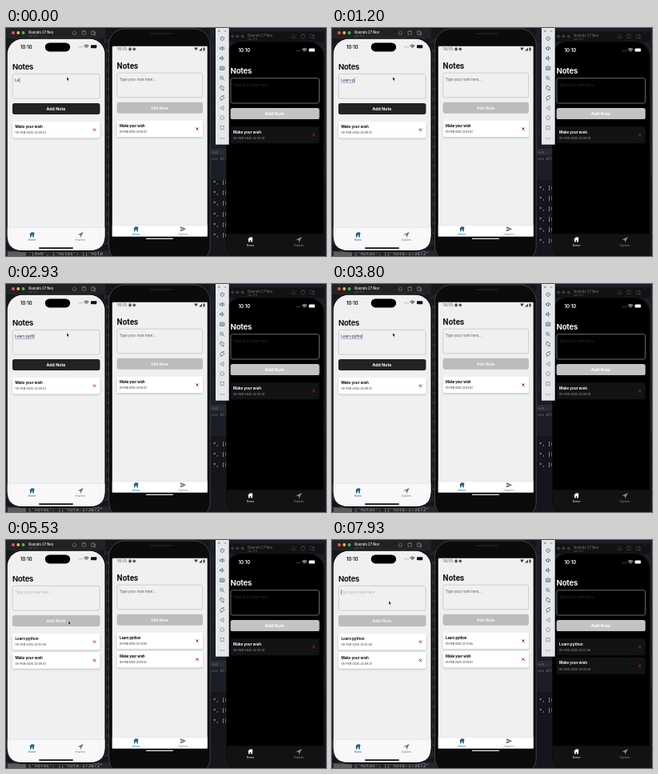
These frames come from a looping animation (400 px wide and 285 px high, 8 s). An HTML page:

```html
<!DOCTYPE html>
<html lang="en">
<head>
<meta charset="utf-8">
<title>Notes on three devices</title>
<style>
  html, body { margin: 0; width: 100%; height: 100%; overflow: hidden; background: #15161b; }
  svg { display: block; width: 100vw; height: 100vh; }
  text { font-family: Inter, Roboto, sans-serif; white-space: pre; }
  .android text { font-family: Roboto, Inter, sans-serif; }
  .mono text { font-family: "DejaVu Sans Mono", "Liberation Mono", monospace; }
  .bold { font-weight: 700; }
  .semi { font-weight: 600; }
  .mid { text-anchor: middle; }
</style>
</head>
<body>
<svg id="stage" viewBox="0 0 400 285" preserveAspectRatio="none">
  <defs>
    <filter id="soft" x="-10%" y="-20%" width="120%" height="160%"><feGaussianBlur stdDeviation="1"/></filter>
    <path id="house" d="M0-4.2 4.2-.4H3V3.8H.9V1H-.9V3.8H-3V-.4H-4.2ZM2-4H3.2V-1H2Z"/>
    <path id="plane" d="M-4.2.3 4.2-4 .3 4.3-.2.2Z"/>
    <path id="send" d="M-4-3.6 4.3 0-4 3.6V.9L1.2 0-4-.9Z"/>
    <g id="wifi" fill="none" stroke-width=".9">
      <path d="M-3-.8Q0-3.4 3-.8M-1.7.6Q0-.9 1.7.6M-.4 1.6H.4"/>
    </g>
    <g id="tools" fill="none" stroke-width=".7">
      <path d="M-2 2.4H2V-1L0-2.8-2-1Z"/>
      <path d="M10.5-2H15.5V2.4H10.5ZM12-2V-3H14V-2"/>
      <path d="M23.5-2.5H27.5V2.5H23.5ZM26-1H29V3H26"/>
    </g>
  </defs>
</svg>
<script>
const LOOP = 8000;
const NAME = 'Quendo 27 Neo';
const NS = 'http://www.w3.org/2000/svg';
const stage = document.getElementById('stage');

function el(parent, tag, attrs = {}, content) {
  const node = document.createElementNS(NS, tag);
  for (const key in attrs) node.setAttribute(key, attrs[key]);
  if (content !== undefined) node.textContent = content;
  parent.appendChild(node);
  return node;
}
const group = (parent, x, y, cls = '', scale = 1) =>
  el(parent, 'g', { transform: `translate(${x} ${y}) scale(${scale})`, class: cls });
const box = (parent, x, y, width, height, fill, rx = 0, more = {}) =>
  el(parent, 'rect', { x, y, width, height, fill, rx, ...more });
const label = (parent, x, y, size, fill, content, cls = '', more = {}) =>
  el(parent, 'text', { x, y, 'font-size': size, fill, class: cls, ...more }, content);
const icon = (parent, id, x, y, colour, scale = 1) =>
  el(parent, 'use', { href: '#' + id, transform: `translate(${x} ${y}) scale(${scale})`, fill: colour, stroke: id === 'wifi' || id === 'tools' ? colour : 'none' });
const path = (parent, d, stroke, width = .8, fill = 'none') =>
  el(parent, 'path', { d, stroke, 'stroke-width': width, fill });
const show = (node, on) => node.setAttribute('visibility', on ? 'visible' : 'hidden');

const LIGHT = { ink: '#111315', page: '#f0f0f0', line: '#c4c4c4', hint: '#b0b0b0', card: '#fff', sub: '#333', cross: '#d01824', off: '#bcbcbc', offInk: '#f3f3f3' };
const DROID = { ...LIGHT, hint: '#666' };
const DARK = { ink: '#f2f2f2', page: '#000', line: '#858585', hint: '#303030', card: '#111314', sub: '#a0a3a6', cross: '#8c1820', off: '#c3c3c3', offInk: '#fff' };

// --- terminal behind the devices
function terminal() {
  const g = el(stage, 'g', { class: 'mono' });
  box(g, 0, 0, 400, 285, '#15161b');
  box(g, 255, 0, 145, 190, '#1b1e27');
  for (let i = 0; i < 23; i++) {
    label(g, 122, 18 + i * 12, 5, '#55585f', i % 3 ? '"no' : '[{"');
    label(g, 397, 18 + i * 12, 5, '#4c4f57', '"');
    if (i < 11) label(g, 254, 10 + i * 12, 5, '#4c4f57', i % 2 ? ' :' : ',"');
  }
  box(g, 255, 151, 22, 8, '#292b31');
  label(g, 257, 157, 4.5, '#777b82', 'zsh -');
  label(g, 257, 165, 4.5, '#858990', '=>> GTT');
  box(g, 0, 278, 130, 7, '#23252b');
  box(g, 2, 279.5, 23, 5.5, '#5a5c62');
  const foot = label(g, 28, 284, 6.2, '#a4a7ad', '');
  const list = el(g, 'g');
  const rows = Array.from({ length: 6 }, (_, i) => label(list, 259, 195 + i * 13.2, 6, '#d8d8da', '*, [C'));
  return { foot, list, rows };
}

function card(parent, colours, title, width, subSize) {
  const g = group(parent, 8, 117);
  if (colours !== DARK) box(g, 0, 2, width, 19.5, '#999', 2, { filter: 'url(#soft)', opacity: .6 });
  box(g, 0, 0, width, 20.5, colours.card, 2);
  label(g, 3.4, 8.4, 4.6, colours.ink, title, 'bold', { 'letter-spacing': -.05 });
  const stamp = title === 'Make your wish' ? '22:09:41' : '22:10:06';
  label(g, 3.4, 15.4, subSize, colours.sub, '05-FEB-2025 ' + stamp);
  const x = width - 7;
  path(g, `M${x - 1.6} 8.6 ${x + 1.6} 11.8M${x + 1.6} 8.6 ${x - 1.6} 11.8`, colours.cross, 1);
  return g;
}

// The notes page shared by all three devices
function app(x, y, colours, { cls = '', width = 109.5, scale = 1 } = {}) {
  const g = group(stage, x, y, cls, scale);
  label(g, 8, 52, cls ? 10 : 9.5, colours.ink, 'Notes', 'bold', { 'letter-spacing': cls ? 0 : -.25 });
  box(g, 8.3, 57.3, width - .6, 30.8, colours.page, 2.2, { stroke: colours.line, 'stroke-width': .8 });
  const hint = label(g, 11.2, 67, cls ? 4.75 : 4.45, colours.hint, 'Type your note here...');
  const button = box(g, 8, 94, width, 13.9, colours.off, 2.6);
  const caption = label(g, 8 + width / 2 - .3, 102.9, 5.25, colours.offInk, 'Add Note', 'bold mid');
  const subSize = cls ? 3.5 : 3.6;
  const fresh = card(g, colours, 'Learn python', width, subSize);
  const wish = card(g, colours, 'Make your wish', width, subSize);
  return { g, hint, button, caption, fresh, wish };
}

function tabs(y, homeX, planeX, on, off, shape) {
  icon(stage, 'house', homeX, y, on, .82);
  icon(stage, shape, planeX, y, off, .9);
  label(stage, homeX, y + 8, 3.4, on, 'Home', 'mid');
  label(stage, planeX, y + 8, 3.4, off, 'Explore', 'mid');
}

function statusBar(x, y, colour) {
  label(stage, x, y, 5.9, colour, '10:10', 'semi');
  for (let i = 0; i < 4; i++) el(stage, 'circle', { cx: x + 72.5 + i * 1.6, cy: y - 1.8, r: .5, fill: '#888' });
  icon(stage, 'wifi', x + 82.5, y - 2.4, colour);
  box(stage, x + 88, y - 4.4, 7.4, 4, colour, 1.2);
}

function titleBar(x, y, fill, lights, ink, toolInk) {
  box(stage, x, y - 6, 124, 13, fill);
  lights.forEach((c, i) => el(stage, 'circle', { cx: x + 9 + i * 6.3, cy: y, r: 1.9, fill: c }));
  label(stage, x + 28, y + .6, 4.2, ink, NAME, 'semi');
  label(stage, x + 28, y + 5, 3.2, '#66666a', 'sim 27.2');
  icon(stage, 'tools', x + 85.5, y, toolInk, .9);
}

function lightPhone() {
  titleBar(0, 6, '#222126', ['#f35b54', '#f3b833', '#37c34a'], '#dedee0', '#8b8b90');
  box(stage, .3, 12, 125.2, 268, '#050505', 20, { stroke: '#45454a', 'stroke-width': .6 });
  box(stage, 1.8, 13.8, 121.7, 264.2, LIGHT.page, 18.5);
  path(stage, 'M1.8 249.5H123.5V259.5Q123.5 278 105 278H20.3Q1.8 278 1.8 259.5Z', 'none', 0, '#f8f8f8');
  path(stage, 'M1.8 249.4H123.5', '#dadada', .5);
  box(stage, 48.8, 18.4, 31.4, 11, '#000', 5.5);
  statusBar(18, 25.6, '#111');
  tabs(258.3, 32.5, 93, '#1d668e', '#707679', 'plane');
  box(stage, 41, 274.2, 43, 1.7, '#111', .8);
  return app(0, 0, LIGHT);
}

function androidPhone() {
  box(stage, 128.6, 1, 126.6, 292, '#0b0b0c', 20, { stroke: '#4c4d51', 'stroke-width': .8 });
  box(stage, 179, 6, 29, 2, '#1b1c1f', 1);
  box(stage, 132.8, 22.8, 118.9, 237.7, DROID.page, 1);
  box(stage, 132.8, 246.6, 118.9, 13.9, '#fff');
  path(stage, 'M132.8 246.5H251.7', '#d8d8d8', .5);
  const bar = el(stage, 'g', { class: 'android' });
  label(bar, 138.5, 28.4, 4.9, '#444', '10:10');
  box(bar, 153.5, 24.5, 3.2, 3.8, '#555', .6);
  el(bar, 'circle', { cx: 160.3, cy: 26.4, r: 1.8, fill: '#555' });
  path(bar, 'M235 24.6H240L237.5 28.3ZM245 24.5V28.4H241.2Z', 'none', 0, '#444');
  box(bar, 246.4, 24.4, 2.2, 4, '#444', .5);
  tabs(251.2, 162.5, 221.5, '#1d668e', '#707679', 'send');
  box(stage, 175, 262.8, 34, 1.3, '#e8e8e8', .6);
  return app(130.6, -1.2, DROID, { cls: 'android', width: 107.4 });
}

function darkPhone() {
  const grey = '#3c3c3e';
  titleBar(274, 10.3, '#121214', [grey, grey, grey], '#626265', '#48484b');
  box(stage, 275, 16.5, 122.7, 274, '#000', 20, { stroke: '#232326', 'stroke-width': .6 });
  path(stage, 'M275.8 257.3H397V270Q397 281 390 285H283Q275.8 281 275.8 270Z', 'none', 0, '#121212');
  statusBar(290.6, 30, '#fff');
  tabs(264.5, 305.5, 366, '#fff', '#8d9295', 'plane');
  return app(272.5, 4.6, DARK, { scale: 1.015 });
}

function emulatorBar() {
  box(stage, 262, 0, 16.7, 145.7, '#e6e7ea');
  const c = '#50585f';
  path(stage, 'M265 2.5 267.6 5.1M267.6 2.5 265 5.1M272.5 4H275.4', c, .6);
  const speaker = 'M-3-1H-1.4L.4-2.8V2.8L-1.4 1H-3Z';
  const diamond = 'M-3 0 0-3 3 0 0 3Z';
  const marks = [
    'M-1.5-2A2.6 2.6 0 1 0 1.5-2M0-3.2V0',
    speaker + 'M1.8-2Q3.8 0 1.8 2',
    speaker + 'M1.8-1Q2.6 0 1.8 1',
    'M-3-1.8H-1.4L-.8-2.8H.8L1.4-1.8H3V2.4H-3ZM-1 .3A1 1 0 1 0 1 .3 1 1 0 1 0-1 .3',
    'M1.2-.5A2 2 0 1 0-2.8-.5 2 2 0 1 0 1.2-.5M.8 1 3 3.2',
    diamond + 'M-3-2.8-1-3.4M3 2.8 1 3.4',
    diamond + 'M3-2.8 1-3.4M-3 2.8-1 3.4',
    'M2-2.8V2.8L-2.8 0Z',
    'M-2.7 0A2.7 2.7 0 1 0 2.7 0 2.7 2.7 0 1 0-2.7 0',
    'M-2.4-2.4H2.4V2.4H-2.4Z'
  ];
  marks.forEach((d, i) => path(group(stage, 270.2, 13 + i * 12.4, '', .88), d, i < 7 ? '#376779' : '#888d93', .95));
  for (const x of [268, 270.2, 272.4]) el(stage, 'circle', { cx: x, cy: 138, r: .6, fill: c });
}

const term = terminal();
const light = lightPhone();
const android = androidPhone();
const dark = darkPhone();
emulatorBar();

const typed = label(light.g, 11.2, 67, 4.6, '#25282b', '');
const underline = box(light.g, 11.2, 68.1, 0, .5, '#5b74c4');
const caret = box(light.g, 0, 62.3, .7, 6, '#3c5fd0');
const mouse = el(stage, 'path', { d: 'M0 0V4.6L1.1 3.7 1.9 5.4 2.7 5 1.9 3.4H3.3Z', fill: '#000', stroke: '#fff', 'stroke-width': .45 });

// --- timeline
const NOTE = 'Learn python';
const KEYS = [130, 200, 330, 600, 1000, 1630, 1870, 1930, 3600, 4000];
const SENT = 5270, FOCUS = 7530;
const ADDED = [[light, 5330], [android, 5470], [dark, 5600]];
const PATH = [[0, 76, 61], [4400, 76, 61], [5000, 78, 101], [5870, 78, 101], [6330, 136, 135],
  [6700, 136, 135], [7270, 113, 86], [7740, 113, 86], [7930, 71, 76]];
// time, scroll, visible rows
const LOGS = [[0, 0, 6], [600, 6.6, 6], [1870, 6.6, 4], [2670, 6.6, 3], [7000, 6.6, 2]];

const ease = u => u * u * (3 - 2 * u);
function pointer(t) {
  const i = PATH.findIndex(p => p[0] > t);
  if (i < 0) return PATH[PATH.length - 1].slice(1);
  const [t0, x0, y0] = PATH[i - 1], [t1, x1, y1] = PATH[i];
  const u = ease((t - t0) / (t1 - t0));
  return [x0 + (x1 - x0) * u, y0 + (y1 - y0) * u];
}

function render(t) {
  const note = t < SENT ? NOTE.slice(0, 2 + KEYS.filter(k => k <= t).length) : '';
  typed.textContent = note;
  const width = note ? typed.getComputedTextLength() : 0;
  caret.setAttribute('x', 11.3 + width);
  underline.setAttribute('width', note.includes(' ') ? width : 0);
  show(caret, note || t >= FOCUS);
  show(light.hint, !note);

  const active = t < 5130;
  light.button.setAttribute('fill', active ? '#222325' : LIGHT.off);
  light.caption.setAttribute('fill', active ? '#fff' : LIGHT.offInk);

  for (const [device, at] of ADDED) {
    show(device.fresh, t >= at);
    device.wish.setAttribute('transform', `translate(8 ${t >= at ? 140.2 : 117})`);
  }

  const [, scroll, count] = LOGS.filter(l => l[0] <= t).pop();
  term.list.setAttribute('transform', `translate(0 ${scroll})`);
  term.rows.forEach((row, i) => show(row, i < count));
  term.foot.textContent = t < 600 ? '"[0x0", {"notes": [["note' : '{"notes": [["note-173872"';

  const [x, y] = pointer(t);
  mouse.setAttribute('transform', `translate(${x} ${y})`);
}

const start = performance.now();
function tick() {
  render((performance.now() - start) % LOOP);
  requestAnimationFrame(tick);
}
tick();
</script>
</body>
</html>
```
